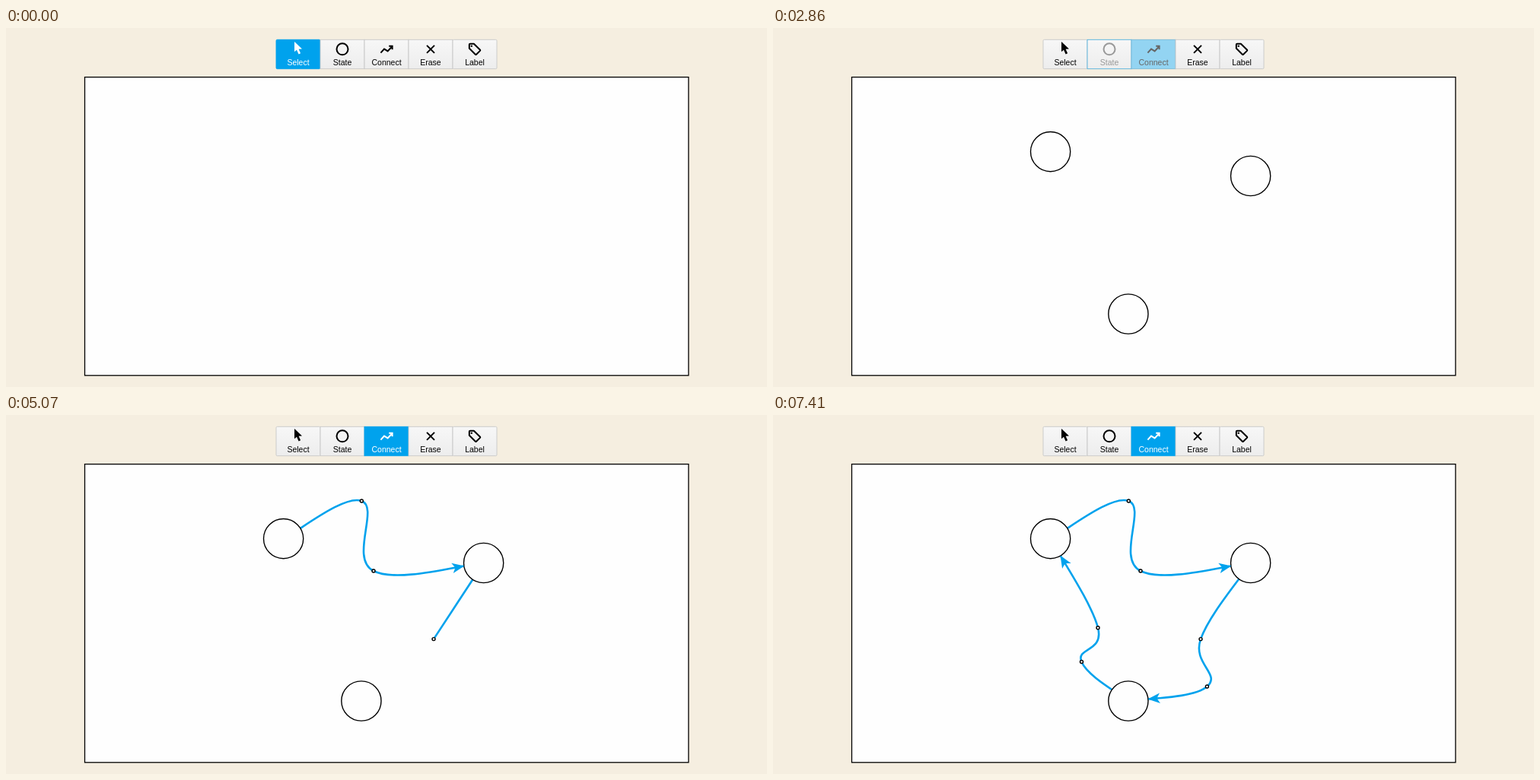
Animation of 1000x472 px, one loop 8000 ms. Source, as an HTML page:

```html
<!DOCTYPE html>
<html lang="en">
<head>
<meta charset="utf-8">
<title>State diagram editor</title>
<style>
  html, body { margin: 0; width: 100%; height: 100%; overflow: hidden; background: #f5eee0; }
  svg { display: block; width: 1000px; height: 472px; }
  text { font: 10.5px "Liberation Sans", Arial, sans-serif; text-anchor: middle; }
  .line { fill: none; stroke: currentColor; stroke-width: 2; }
  .edge { fill: none; stroke: #00a2ed; stroke-width: 2.6; }
  .arrow { fill: #00a2ed; }
  .state { fill: #fefefe; stroke: #000; stroke-width: 1.4; }
  .knot { fill: #fff; stroke: #000; stroke-width: 1.4; }
</style>
</head>
<body>
<svg id="stage" viewBox="0 0 1000 472">
  <defs>
    <linearGradient id="face" x2="0" y2="1">
      <stop stop-color="#f7f7f7"/><stop offset="1" stop-color="#ededed"/>
    </linearGradient>
  </defs>
  <rect x="103.5" y="64.6" width="793.4" height="392.2" fill="#fefefe" stroke="#000" stroke-width="1.3"/>
  <g id="tools"></g>
  <g id="edges"></g>
  <g id="states"></g>
  <g id="marks"></g>
</svg>
<script>
const LOOP = 8000, R = 26.1, SMOOTH = 0.2;
const BLUE = [0, 162, 237], FACE = [245, 245, 245], RIM = [200, 200, 200];
const BLACK = [0, 0, 0], WHITE = [255, 255, 255];

// Icons are drawn around the centre of their button.
const TOOLS = [
  ['Select', '<path fill="currentColor" d="M-5 18V31.3L-2 28.7L.6 34.4L3.1 33.3L.6 27.8L5 27.4Z"/>'],
  ['State', '<circle class="line" cy="27.8" r="7.5"/>'],
  ['Connect', '<path class="line" d="M-7.6 32.6L-3 27.6L1.6 30.4L7.4 24.2M3.2 23.8H7.6V28.2"/>'],
  ['Erase', '<path class="line" d="M-5 22.9L5 32.9M5 22.9L-5 32.9"/>'],
  ['Label', '<path class="line" stroke-linejoin="round" d="M-7.2 21.8Q-7.2 20.7 -6.1 20.7H-1.2L7 28.7Q7.5 29.3 7 29.9L2 34.7Q1.4 35.3 .8 34.7L-7.2 26.8Z"/>' +
            '<circle fill="currentColor" cx="-4.2" cy="23.7" r="1.2"/>']
];

const STATES = [[364.6, 162.6], [627.6, 194.5], [466.9, 376]];
const STATE_TIMES = [1430, 1820, 2210];

// Each edge: first knot, second knot and closing click.
const EDGES = [
  { from: 0, to: 1, knots: [[467.3, 113], [483, 205]], times: [3640, 3900, 4420] },
  { from: 1, to: 2, knots: [[562, 294.6], [570.4, 357]], times: [5070, 5330, 5850] },
  { from: 2, to: 0, knots: [[405.5, 324.5], [427, 279.8]], times: [6500, 6890, 7410] }
];

// Tool changes: start time, tool left, tool chosen.
const SWITCHES = [[780, 0, 1], [2730, 1, 2]];
const FADE = [0.08, 0.4, 0.94, 1], STEP = 130;

const el = id => document.getElementById(id);
const mix = (a, b, k) => `rgb(${a.map((v, i) => Math.round(v + (b[i] - v) * k))})`;

el('tools').innerHTML = TOOLS.map(([name, icon], i) => `
  <g transform="translate(${384 + i * 58} 0)">
    <rect x="-29" y="15.3" width="58" height="38.4" rx="${i % 4 ? 0 : 1.5}"/>
    ${icon}<text y="48.8" fill="currentColor">${name}</text>
  </g>`).join('');
const buttons = [...el('tools').children];

function paintTools(t) {
  let on = 0, off = -1, k = 1;
  for (const [start, a, b] of SWITCHES) {
    if (t < start) continue;
    off = a;
    on = b;
    k = FADE[Math.min(3, Math.floor((t - start) / STEP))];
  }
  buttons.forEach((g, i) => {
    const lit = i === on ? k : i === off ? 1 - k : 0;
    const face = g.firstElementChild;
    g.style.color = mix(BLACK, WHITE, lit);
    // The gradient returns at once; only the chosen face fades in.
    face.setAttribute('fill', i === on ? mix(FACE, BLUE, k) : 'url(#face)');
    face.setAttribute('stroke', mix(RIM, BLUE, lit));
    face.setAttribute('stroke-width', 0.9);
  });
}

// Smooth path: each handle follows the line between the neighbouring points.
function segments(pts) {
  const handle = (i, sign) => {
    const p = pts[i - 1] || pts[i], q = pts[i + 1] || pts[i];
    return pts[i].map((v, k) => v + sign * SMOOTH * (q[k] - p[k]));
  };
  return pts.slice(1).map((p, i) => [pts[i], handle(i, 1), handle(i + 1, -1), p]);
}

function bezier([a, b, c, d], t) {
  const u = 1 - t;
  return [0, 1].map(k => u * u * u * a[k] + 3 * u * u * t * b[k] + 3 * u * t * t * c[k] + t * t * t * d[k]);
}

// Arrowhead where the last segment meets the rim of its state.
function arrow(seg) {
  let lo = 0.3, hi = 1;
  for (let i = 0; i < 24; i++) {
    const m = (lo + hi) / 2, [x, y] = bezier(seg, m);
    if (Math.hypot(x - seg[3][0], y - seg[3][1]) > R - 0.4) lo = m; else hi = m;
  }
  const [x, y] = bezier(seg, lo), [px, py] = bezier(seg, lo - 0.06);
  const turn = Math.atan2(y - py, x - px) * 180 / Math.PI;
  return `<path class="arrow" transform="translate(${x} ${y}) rotate(${turn})" d="M0 0L-16 -6.8L-12 0L-16 6.8Z"/>`;
}

function paintDiagram(t) {
  let lines = '', marks = '';
  for (const { from, to, knots, times } of EDGES) {
    const n = times.filter(v => t >= v).length;
    if (!n) continue;
    const segs = segments([STATES[from], ...knots, STATES[to]].slice(0, n + 1));
    lines += `<path class="edge" d="M${segs[0][0]}${segs.map(s => 'C' + s.slice(1).join(' ')).join('')}"/>`;
    if (n === 3) marks += arrow(segs[2]);
    marks += knots.slice(0, n).map(([x, y]) => `<circle class="knot" cx="${x}" cy="${y}" r="2"/>`).join('');
  }
  el('edges').innerHTML = lines;
  el('marks').innerHTML = marks;
  el('states').innerHTML = STATES.map(([x, y], i) =>
    t >= STATE_TIMES[i] ? `<circle class="state" cx="${x}" cy="${y}" r="${R}"/>` : '').join('');
}

const began = performance.now();
function draw() {
  const t = (performance.now() - began) % LOOP;
  paintTools(t);
  paintDiagram(t);
  requestAnimationFrame(draw);
}
draw();
</script>
</body>
</html>
```
